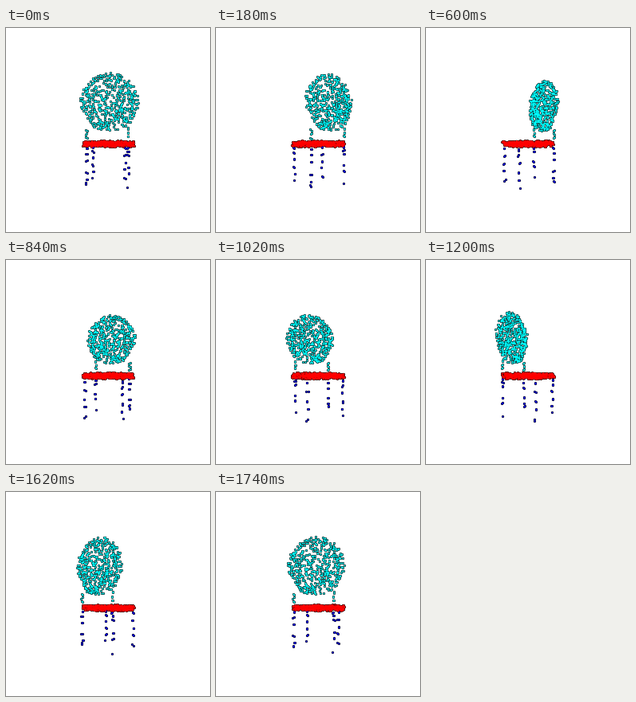
Animation, 256 px wide and 256 px high, one loop 1.8 s. Source, as a matplotlib script:

```python
import numpy as np
import matplotlib.pyplot as plt
from matplotlib.animation import FuncAnimation

SIZE, DPI = 256, 64
FRAMES, INTERVAL = 30, 60
CX, HORIZON = 128, 135      # rotation axis and eye level, in pixels
DIST = 245                  # camera distance
START = np.radians(-2)

rng = np.random.default_rng(7)


def disc(n, radius):
    r = radius * np.sqrt(rng.random(n))
    t = rng.uniform(0, 2 * np.pi, n)
    return r * np.cos(t), r * np.sin(t)


def post(u, z, heights):
    h = np.repeat(heights, 2).astype(float)
    n = len(h)
    return np.column_stack([u + rng.uniform(-1.2, 1.2, n),
                            h + rng.uniform(-1, 1, n),
                            z + rng.uniform(-1.2, 1.2, n)])


def make_back():
    u, h = disc(520, 33.5)
    rest = np.column_stack([u + 1.8, h - 38.5, 22 + rng.uniform(-2.2, 2.2, len(u))])
    return np.vstack([rest, post(-24, 22, [-6, -2, 3]), post(24, 22, [-8, -3, 1])])


def make_seat():
    u, z = disc(620, 33)
    return np.column_stack([u, rng.uniform(6.8, 12.8, len(u)), z])


def make_legs():
    return np.vstack([
        post(-24, 22, [15, 21, 28, 42, 51, 55]),
        post(23.5, 22, [14, 18, 23, 37, 43, 58])[:-1],
        post(22, -23, [17, 26, 37, 46, 58]),
        post(-22, -23, [16, 22, 30, 41, 49, 57])[:-1],
    ])


def project(pts, angle):
    u, h, z = pts.T
    c, s = np.cos(angle), np.sin(angle)
    scale = DIST / (DIST - (z * c - u * s))
    return np.column_stack([CX + scale * (u * c + z * s), HORIZON + scale * h])


fig = plt.figure(figsize=(SIZE / DPI, SIZE / DPI), dpi=DPI, facecolor="white")
ax = fig.add_axes([0, 0, 1, 1])
ax.set(xlim=(0, SIZE), ylim=(SIZE, 0))
ax.axis("off")


def dots(color, diameter, zorder):
    return ax.scatter([], [], s=(diameter * 72 / DPI) ** 2, c=color, linewidths=0,
                      antialiased=False, zorder=zorder)


# Each part is a black halo layer below a coloured layer.
parts = [(pts, dots("black", 3.2, 1), dots(color, 2.0, 2))
         for pts, color in [(make_legs(), "#0000ff"),
                            (make_back(), "#00ffff"),
                            (make_seat(), "#ff0000")]]


def update(i):
    angle = START + 2 * np.pi * i / FRAMES
    for pts, halo, fill in parts:
        xy = project(pts, angle)
        halo.set_offsets(xy)
        fill.set_offsets(xy)
    return [a for _, halo, fill in parts for a in (halo, fill)]


anim = FuncAnimation(fig, update, frames=FRAMES, interval=INTERVAL,
                     repeat=True, repeat_delay=0)
plt.show()
```
